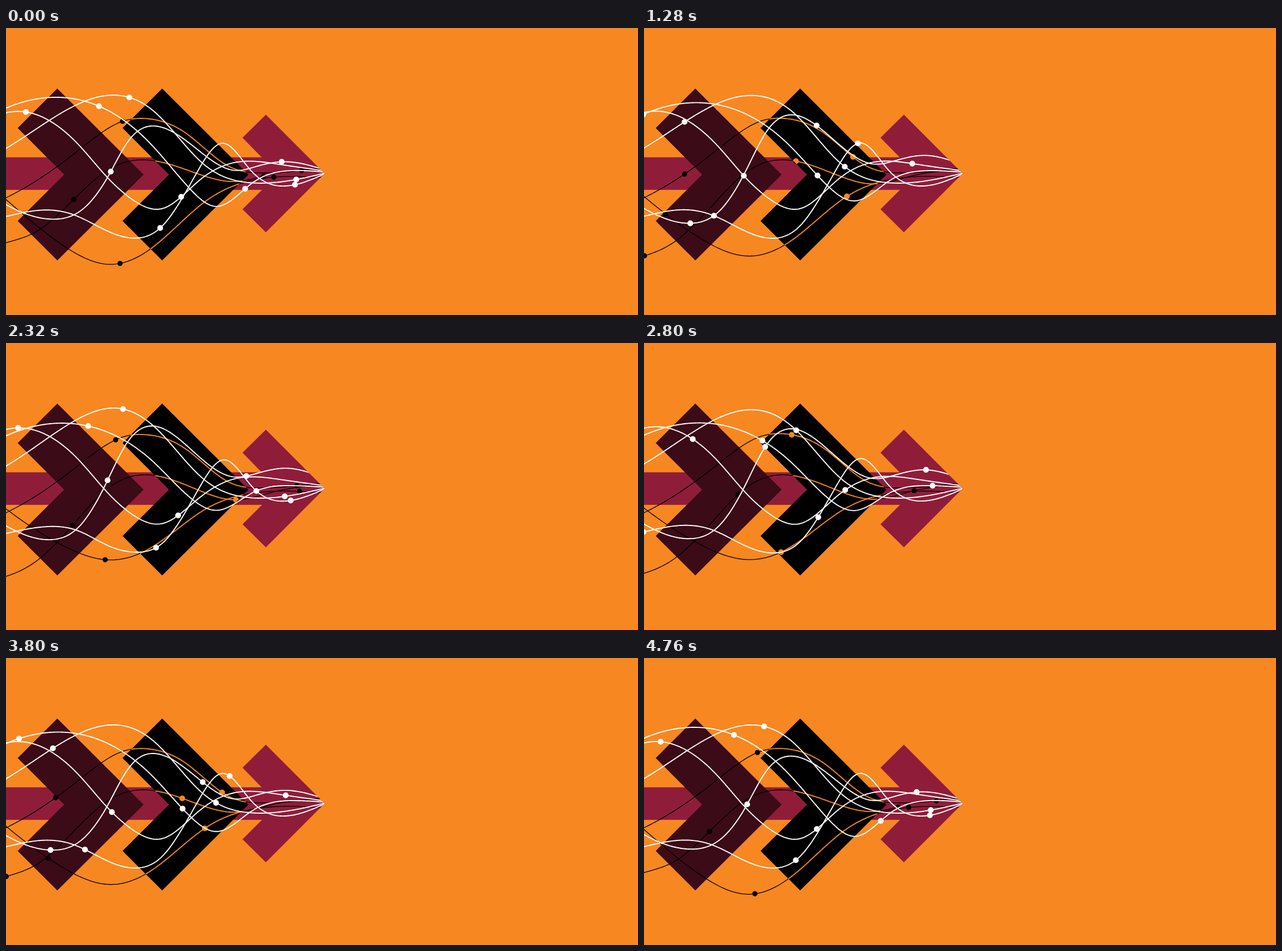
Write an HTML page with a canvas that moves like this. It is 1109 by 505 pixels and loops after 4800 ms.

```html
<!DOCTYPE html>
<html lang="en">
<head>
<meta charset="utf-8">
<title>Flowing strands</title>
<style>
  html, body { margin: 0; width: 100%; height: 100%; overflow: hidden; background: #f78721; }
  canvas { display: block; width: 1109px; height: 505px; }
</style>
</head>
<body>
<canvas id="stage"></canvas>
<script>
const W = 1109, H = 505, LOOP = 4800, TURN = 2 * Math.PI;
const SPEED = 0.1435, LEFT = -6, RIGHT = 560, STEP = 2;
const ORANGE = '#f78721', MAROON = '#8f1d3a', DARK = '#3b0b17', BLACK = '#000', WHITE = '#fff';
const canvas = document.getElementById('stage');
const ctx = canvas.getContext('2d');
const dpr = window.devicePixelRatio || 1;
canvas.width = Math.round(W * dpr);
canvas.height = Math.round(H * dpr);

// knots: x, y and how far y sways. peak: time of the greatest slow sway;
// strands without it sway with the quick drift. slide: sideways share of the drift.
// beads: the times at which beads enter on the left.
const strands = [
  { color: BLACK, beads: [658, 3044], slide: 0, knots: [
    [-40, 318], [40, 277], [125, 217], [207, 163.5, .5], [245, 159.5, .7],
    [314, 184, .6], [390, 243, .5], [450, 255], [565, 245]] },
  { color: BLACK, beads: [1231, 3755], slide: 0, peak: 2150, knots: [
    [-40, 405, 15], [0, 394, 17], [56, 369, 13], [115, 314, 9], [180, 252, 3],
    [240, 232], [338, 258, 1], [400, 273, 3], [470, 259, 3], [565, 248]] },
  { color: BLACK, beads: [890, 3096], slide: -.7, peak: 200, knots: [
    [-40, 262, 4], [0, 296, 6], [97, 367, 14], [183, 398.5, 18], [255, 374, 14],
    [350, 299, 6], [424, 268, 2], [565, 264]] },
  { color: WHITE, beads: [1245, 3584], slide: .5, peak: 2500, knots: [
    [-40, 172, 11], [0, 152, 11], [80, 132, 10], [169, 147, 7], [256, 207, 1],
    [322, 277, -5], [370, 304, -10], [432, 268, -5], [500, 251], [565, 254]] },
  { color: WHITE, beads: [642, 3068], slide: 0, knots: [
    [-40, 236, 1.6], [23, 198, 1.6], [122, 136], [195, 118, -1.3], [260, 147],
    [345, 238], [432, 272.5], [512, 266], [565, 254]] },
  { color: WHITE, beads: [2128, 4513], slide: 0, knots: [
    [-40, 163, 1], [12, 147.5, 1], [127, 205], [177, 262], [222, 302],
    [275, 317.5], [340, 268, 1.5], [401, 237, .8], [480, 240], [565, 252]] },
  { color: WHITE, beads: [631, 3175], slide: -1, peak: 4500, knots: [
    [-40, 291, -5], [0, 315.5, -5], [85, 341, -5], [130, 323, -1], [177, 257, 8], [215, 187, 12],
    [265, 160, 14], [335, 204, 10], [400, 243, 8], [443, 236, 7], [492, 228, 8], [565, 246, 6]] },
  { color: WHITE, beads: [365, 2766], slide: 1, knots: [
    [-40, 341, 1], [0, 332, 1], [70, 320.5, 1], [120, 329], [180, 358], [230, 369.5, -.6],
    [273, 350, .5], [335, 255, 1], [380, 203, 1], [430, 251, 1], [490, 278], [565, 254]] }
];

// Two beating waves: calm early in the loop, lively around 0.69 of it
function drift(t) {
  const a = TURN * (t / LOOP - 0.69);
  return -1.6 * (Math.cos(2 * a) + Math.cos(3 * a));
}

// Second derivatives of the natural cubic spline through p
function bends(p) {
  const n = p.length - 1, c = [0], d = [0], m = Array(n + 1).fill(0);
  for (let i = 1; i < n; i++) {
    const h0 = p[i].x - p[i - 1].x, h1 = p[i + 1].x - p[i].x;
    const rise = (p[i + 1].y - p[i].y) / h1 - (p[i].y - p[i - 1].y) / h0;
    const w = 2 * (h0 + h1) - h0 * c[i - 1];
    c[i] = h1 / w;
    d[i] = (6 * rise - h0 * d[i - 1]) / w;
  }
  for (let i = n - 1; i > 0; i--) m[i] = d[i] - c[i] * m[i + 1];
  return m;
}

// The strand at time t, sampled evenly in x, with its running length
function shape(s, t) {
  const shift = drift(t);
  const wave = s.peak === undefined ? shift : Math.cos(TURN * (t - s.peak) / LOOP);
  const p = s.knots.map(([x, y, sway = 0]) => ({
    x: x + s.slide * shift * Math.min(1, (565 - x) / 130),
    y: y + sway * wave
  }));
  const m = bends(p), ys = [], len = [];
  let k = 0;
  for (let x = LEFT; x <= RIGHT; x += STEP) {
    while (k < p.length - 2 && p[k + 1].x < x) k++;
    const h = p[k + 1].x - p[k].x, u = (x - p[k].x) / h, v = 1 - u;
    ys.push(v * p[k].y + u * p[k + 1].y
      + h * h / 6 * ((v ** 3 - v) * m[k] + (u ** 3 - u) * m[k + 1]));
    const i = ys.length - 1;
    len.push(i ? len[i - 1] + Math.hypot(STEP, ys[i] - ys[i - 1]) : 0);
  }
  return { ys, len };
}

// Beads run along the strand at a constant speed
function beadSpots(s, { ys, len }, t) {
  const spots = [];
  for (const enter of s.beads) {
    for (let age = (t - enter + LOOP) % LOOP; ; age += LOOP) {
      const d = age * SPEED;
      if (d >= len[len.length - 1]) break;
      let i = 0;
      while (len[i + 1] < d) i++;
      const u = (d - len[i]) / (len[i + 1] - len[i]);
      spots.push([LEFT + STEP * (i + u), ys[i] + (ys[i + 1] - ys[i]) * u]);
    }
  }
  return spots;
}

function polygon(points) {
  const path = new Path2D();
  points.forEach(([x, y]) => path.lineTo(x, y));
  path.closePath();
  return path;
}

const chevron = x => polygon([[x, 106.5], [x + 151.5, 258], [x, 409], [x - 69.5, 339.5], [x + 12, 258], [x - 69.5, 176]]);
const darkChevron = chevron(90), blackChevron = chevron(274);
const head = polygon([[456, 152.5], [559, 256], [456, 359.5], [415, 319], [449, 285], [449, 228], [415, 193]]);
const funnel = polygon([[-50, -353], [559, 256], [-50, 865]]);

function fill(path, color) {
  ctx.fillStyle = color;
  ctx.fill(path);
}

function ink(items, color, width, radius) {
  ctx.strokeStyle = ctx.fillStyle = color;
  ctx.lineWidth = width;
  for (const { line, spots } of items) {
    ctx.stroke(line);
    for (const [x, y] of spots) {
      ctx.beginPath();
      ctx.arc(x, y, radius, 0, TURN);
      ctx.fill();
    }
  }
}

function draw(t) {
  ctx.setTransform(dpr, 0, 0, dpr, 0, 0);
  ctx.fillStyle = ORANGE;
  ctx.fillRect(0, 0, W, H);
  ctx.fillStyle = MAROON;
  ctx.fillRect(0, 227.5, 450, 57.3);
  fill(head, MAROON);
  fill(darkChevron, DARK);
  fill(blackChevron, BLACK);

  const items = strands.map(s => {
    const form = shape(s, t), line = new Path2D();
    form.ys.forEach((y, i) => line.lineTo(LEFT + i * STEP, y));
    return { color: s.color, line, spots: beadSpots(s, form, t) };
  });
  const black = items.filter(o => o.color === BLACK);
  const white = items.filter(o => o.color === WHITE);

  ctx.save();
  ctx.clip(funnel);
  ink(black, BLACK, 1.3, 4.6);
  ctx.save();
  ctx.clip(blackChevron);
  ink(black, ORANGE, 1.9, 5);
  ctx.restore();
  ink(white, WHITE, 1.9, 5.1);
  ctx.restore();
}

const start = performance.now();
function tick() {
  draw((performance.now() - start) % LOOP);
  requestAnimationFrame(tick);
}
tick();
</script>
</body>
</html>
```
